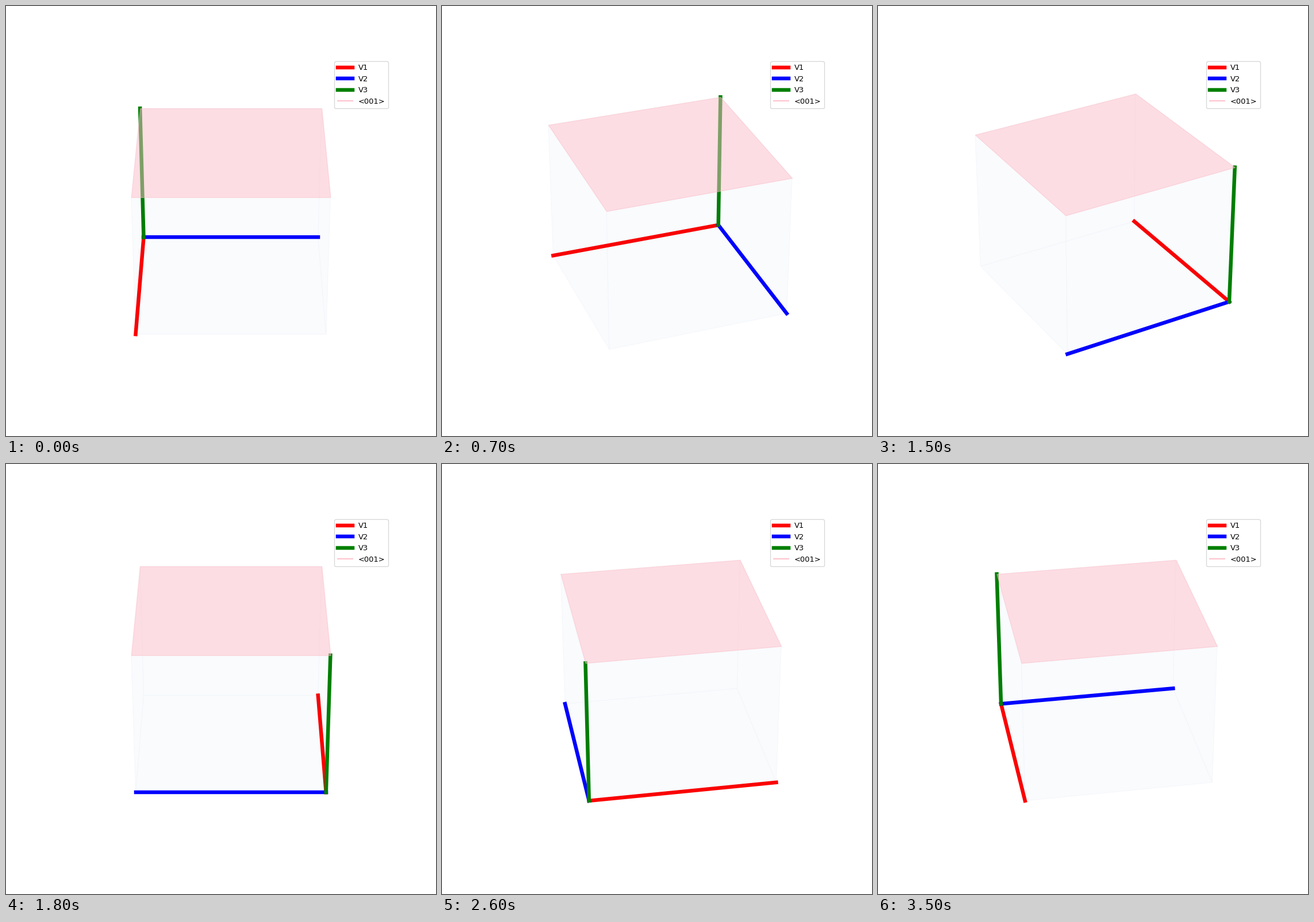
Animation, 748 px wide and 748 px high, one loop 3.6 s. Source, as a matplotlib script:

```python
import itertools

import matplotlib.pyplot as plt
import numpy as np
from matplotlib.animation import FuncAnimation
from matplotlib.colors import to_rgba
from mpl_toolkits.mplot3d.art3d import Poly3DCollection

FRAMES = 36
INTERVAL = 100

fig = plt.figure(figsize=(8, 8), dpi=93.5)
ax = fig.add_subplot(projection="3d")
ax.set_axis_off()


def face(axis, level):
    """Corners of the unit-cube face where the given axis equals level."""
    ring = [(0, 0), (1, 0), (1, 1), (0, 1)]
    return [np.insert(np.array(p, float), axis, level) for p in ring]


def add_faces(faces, color, alpha):
    rgba = [to_rgba(color, alpha)] * len(faces)
    ax.add_collection3d(Poly3DCollection(
        faces, facecolors=rgba, edgecolors=rgba, linewidths=1))


# Lattice vectors
for i, color in enumerate(["red", "blue", "green"]):
    tip = np.eye(3)[i]
    ax.plot(*[(0, t) for t in tip], color=color, lw=5, label=f"V{i + 1}")
ax.plot([], [], [], color="pink", lw=1.5, label="<001>")

# Unit cell and the highlighted plane
add_faces([face(a, v) for a, v in itertools.product(range(3), (0, 1))], "C0", 0.01)
add_faces([face(2, 1)], "pink", 0.5)

# 5 % margin in x and y, none in z, plus the default view padding
pad = 25 / 24
half_xy, half_z = 0.55 * pad, 0.5 * pad
ax.set_xlim(0.5 - half_xy, 0.5 + half_xy)
ax.set_ylim(0.5 - half_xy, 0.5 + half_xy)
ax.set_zlim(0.5 - half_z, 0.5 + half_z)
ax.legend(loc="upper right")


def update(frame):
    ax.view_init(elev=30, azim=frame * 360 / FRAMES)
    return []


anim = FuncAnimation(fig, update, frames=FRAMES, interval=INTERVAL,
                     repeat=True, repeat_delay=0, blit=False)
plt.show()
```
